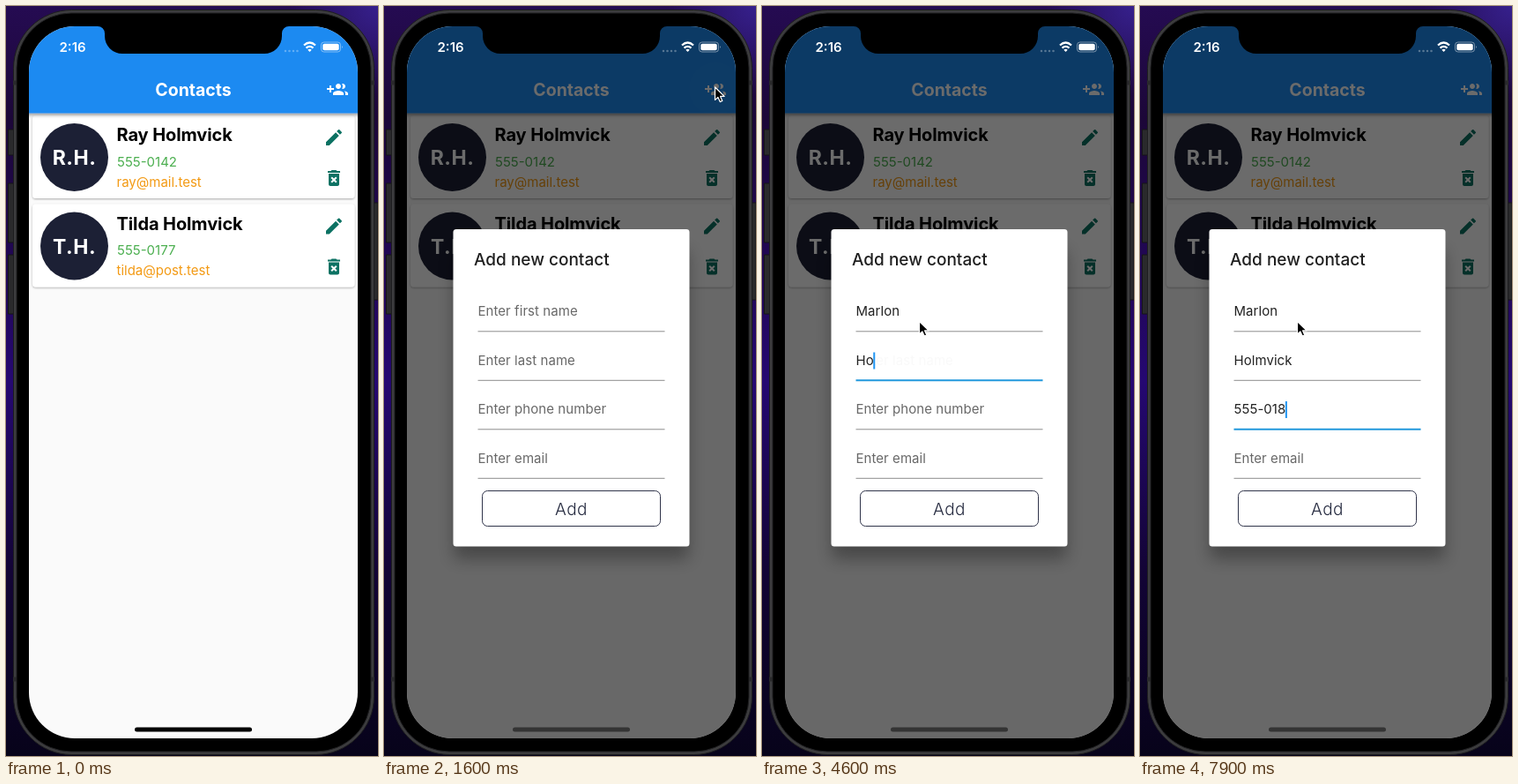
These frames come from a looping animation (422 by 850 pixels, 8000 ms). An HTML page:

```html
<!DOCTYPE html>
<html lang="en">
<head>
<meta charset="utf-8">
<title>Contacts</title>
<style>
html, body { margin: 0; width: 100%; height: 100%; overflow: hidden; background: #120833; }
svg { display: block; width: 422px; height: 850px; font: 15px Inter, "Open Sans", sans-serif; }
text { white-space: pre; }
.mid { text-anchor: middle; }
.name { font-size: 20px; font-weight: 700; letter-spacing: -.1px; }
.initials { font-size: 23px; font-weight: 700; letter-spacing: .5px; fill: #fff; }
.hint { fill: #686868; letter-spacing: .06px; }
.typed { fill: #222; letter-spacing: .06px; }
</style>
</head>
<body>
<svg viewBox="0 0 422 850">
  <defs>
    <linearGradient id="wall" x2="0" y2="1">
      <stop offset="0" stop-color="#250b52"/>
      <stop offset=".15" stop-color="#1c0738"/>
      <stop offset=".38" stop-color="#22075a"/>
      <stop offset=".5" stop-color="#250872"/>
      <stop offset=".75" stop-color="#130436"/>
      <stop offset="1" stop-color="#07031a"/>
    </linearGradient>
    <radialGradient id="glow" cx="1" cy="0" r="1">
      <stop offset="0" stop-color="#36208c"/>
      <stop offset="1" stop-color="#36208c" stop-opacity="0"/>
    </radialGradient>
    <filter id="cardShadow" x="-5%" y="-10%" width="110%" height="125%">
      <feDropShadow dx="0" dy="1" stdDeviation="1" flood-opacity=".32"/>
    </filter>
    <filter id="barShadow" x="-5%" y="-5%" width="110%" height="120%">
      <feDropShadow dx="0" dy="2" stdDeviation="2" flood-opacity=".4"/>
    </filter>
    <filter id="soft" x="-30%" y="-30%" width="160%" height="160%"><feGaussianBlur stdDeviation="9"/></filter>
    <clipPath id="screen"><rect x="26" y="23" width="373" height="807" rx="52"/></clipPath>
    <path id="edit" d="M3 17.25V21h3.75L17.81 9.94l-3.75-3.75L3 17.25zM20.71 7.04a1 1 0 0 0 0-1.41l-2.34-2.34a1 1 0 0 0-1.41 0l-1.83 1.83 3.75 3.75 1.83-1.83z"/>
    <path id="bin" d="M6 19c0 1.1.9 2 2 2h8c1.1 0 2-.9 2-2V7H6v12zm2.46-7.12l1.41-1.41L12 12.59l2.12-2.12 1.41 1.41L13.41 14l2.12 2.12-1.41 1.41L12 15.41l-2.12 2.12-1.41-1.41L10.59 14l-2.13-2.12zM15.5 4l-1-1h-5l-1 1H5v2h14V4z"/>
  </defs>

  <rect width="422" height="850" fill="url(#wall)"/>
  <rect x="322" width="100" height="100" fill="url(#glow)"/>

  <!-- phone body -->
  <path fill="#2a2a2c" stroke="#151517" d="M2.500 140h6v29h-6zM2.500 201h6v67h-6zM2.500 282h6v67h-6zM417 223h5v110h-5z"/>
  <rect x="8.500" y="4.500" width="409" height="844" rx="66" fill="#3c3c3e" stroke="#1c1c1e"/>
  <path d="M8 87h6M8 763h6M412 87h6M412 763h6" stroke="#2a2a2c" stroke-width="5"/>
  <rect x="12" y="8" width="402" height="837" rx="62" fill="#000" stroke="#222224"/>

  <g clip-path="url(#screen)">
    <rect x="26" y="23" width="373" height="807" fill="#fafafa"/>
    <g id="cards"></g>
    <rect x="20" y="10" width="385" height="111.500" fill="#1e8af1" filter="url(#barShadow)"/>
    <text class="mid" x="212.500" y="101.500" fill="#fff" font-size="19.500" font-weight="700">Contacts</text>
    <circle id="ripple" cx="376" cy="94" fill="#fff" r="30"/>
    <path transform="translate(364 83)" fill="#fff" d="M8 10H5V7H3v3H0v2h3v3h2v-3h3v-2zm10 1c1.660 0 2.990-1.340 2.990-3S19.660 5 18 5c-.32 0-.63.05-.91.14.57.81.9 1.790.9 2.860s-.34 2.040-.9 2.860c.28.09.59.14.91.14zm-5 0c1.660 0 2.990-1.340 2.990-3S14.660 5 13 5c-1.660 0-3 1.340-3 3s1.340 3 3 3zm6.620 2.160c.83.73 1.380 1.660 1.380 2.840v2h3v-2c0-1.540-2.370-2.490-4.380-2.840zM13 13c-2 0-6 1-6 3v2h12v-2c0-2-4-3-6-3z"/>
    <rect id="shade" x="26" y="23" width="373" height="807"/>
    <g id="dialog">
      <rect x="79" y="277" width="267" height="350" rx="6" opacity=".3" filter="url(#soft)"/>
      <rect x="78.500" y="253" width="268" height="359.500" rx="3.500" fill="#fff"/>
      <text x="102" y="294" font-size="19" font-weight="500" fill="#1f1f1f">Add new contact</text>
      <g id="fields"></g>
      <rect id="caret" width="2" height="19" fill="#2196f3"/>
      <rect x="111.500" y="549.500" width="202" height="40" rx="6" fill="none" stroke="#30344a"/>
      <text class="mid" x="212.500" y="576.500" font-size="19" font-weight="300" letter-spacing=".4" fill="#262b40">Add</text>
    </g>
    <rect id="home" x="146" y="817.500" width="133" height="5" rx="2.500"/>
  </g>

  <!-- notch and status bar -->
  <path d="M104 22v1a8 8 0 0 1 8 8v3a20 20 0 0 0 20 20h161a20 20 0 0 0 20-20v-3a8 8 0 0 1 8-8v-1z"/>
  <g fill="#fff">
    <text x="60.500" y="52" font-weight="600">2:16</text>
    <path d="M317 51h16" stroke="#fff" stroke-width="2.600" stroke-linecap="round" stroke-dasharray="0 4.500" opacity=".3"/>
    <g fill="none" stroke="#fff" stroke-width="2.300">
      <path d="M338 44.500q6.500-6 13 0M340.500 47.700q4-3.600 8 0"/>
    </g>
    <path d="M342.300 49.700q2.200-1.800 4.400 0l-2.200 2.300z"/>
    <rect x="357.500" y="41" width="22" height="11" rx="3.200" fill="none" stroke="#fff" opacity=".45"/>
    <rect x="359.300" y="42.800" width="18.400" height="7.400" rx="1.800"/>
    <path d="M381 45q1.600 1.500 0 3z" opacity=".6"/>
  </g>

  <path id="cursor" d="M0 0V14.500L3.400 11.400L5.700 16.600L8.300 15.500L6.100 10.400H10.600Z" stroke="#fff" stroke-width="1.200" stroke-linejoin="round"/>
</svg>

<script>
const LOOP = 8000;
const $ = id => document.getElementById(id);
const clamp = v => Math.max(0, Math.min(1, v));
const ramp = (t, from, to) => clamp((t - from) / (to - from));
const ease = p => p * p * (3 - 2 * p);
const mix = (a, b, p) => a + (b - a) * p;

const contacts = [
  ["Ray Holmvick", "R.H.", "555-0142", "ray@mail.test"],
  ["Tilda Holmvick", "T.H.", "555-0177", "tilda@post.test"]
];
$("cards").innerHTML = contacts.map(([name, initials, phone, email], i) => `
  <g transform="translate(0 ${i * 100.5})">
    <rect x="30" y="124" width="365.500" height="94" rx="4" fill="#fff" filter="url(#cardShadow)"/>
    <circle cx="77.500" cy="171.500" r="38.500" fill="#1c2035"/>
    <text class="initials mid" x="77.500" y="180">${initials}</text>
    <text class="name" x="125.500" y="153">${name}</text>
    <text x="126" y="181.500" fill="#4caf50">${phone}</text>
    <text x="125.500" y="204.500" fill="#f39a14">${email}</text>
    <g fill="#0c7263"><use href="#edit" x="360" y="137"/><use href="#bin" x="360" y="183"/></g>
  </g>`).join("");

// focus: field gets the caret; start and step: typing rhythm
const fields = [
  { hint: "Enter first name", text: "Marlon", focus: 2800, start: 3150, step: 150 },
  { hint: "Enter last name", text: "Holmvick", focus: 4150, start: 4350, step: 150 },
  { hint: "Enter phone number", text: "555-018", focus: 5750, start: 6600, step: 200 },
  { hint: "Enter email", text: "", focus: Infinity, start: Infinity, step: 1 }
];
$("fields").innerHTML = fields.map((f, i) => `
  <g transform="translate(0 ${i * 55.5})">
    <text class="hint" x="106.500" y="351">${f.hint}</text>
    <text class="typed" x="106.500" y="351"></text>
    <path class="line" d="M106.500 368.800H318.500"/>
  </g>`).join("");
fields.forEach((f, i) => {
  const row = $("fields").children[i];
  [f.hintEl, f.typedEl, f.lineEl] = row.children;
});

function drawFields(t) {
  const active = fields.filter(f => t >= f.focus).length - 1;
  fields.forEach((f, i) => {
    const count = t < f.start ? 0 : Math.min(f.text.length, Math.floor((t - f.start) / f.step) + 1);
    f.typedEl.textContent = f.text.slice(0, count);
    f.hintEl.setAttribute("opacity", count ? 1 - ramp(t, f.start, f.start + 260) : 1);
    f.lineEl.setAttribute("stroke", i === active ? "#2298dc" : "#8c8c8c");
    f.lineEl.setAttribute("stroke-width", i === active ? 2 : 1);
    if (i !== active) return;
    const lastInput = count ? f.start + (count - 1) * f.step : f.focus;
    const x = 106 + (count ? f.typedEl.getComputedTextLength() : 0);
    $("caret").setAttribute("transform", `translate(${x} ${337 + i * 55.5})`);
    $("caret").setAttribute("opacity", (t - lastInput) % 1000 < 500 ? 1 : 0);
  });
  if (active < 0) $("caret").setAttribute("opacity", 0);
}

function drawCursor(t) {
  const enter = ease(ramp(t, 600, 1150));
  const down = ease(ramp(t, 1850, 2550));
  const x = mix(mix(426, 375.5, enter), 178.5, down);
  const y = mix(mix(250, 92, enter), 357.5, down);
  $("cursor").setAttribute("transform", `translate(${x} ${y})`);
}

function draw(now) {
  const t = now % LOOP;
  const open = ramp(t, 1440, 1590);
  $("shade").setAttribute("opacity", .58 * open);
  $("dialog").setAttribute("opacity", open);
  $("home").setAttribute("opacity", 1 - .5 * open);
  $("ripple").setAttribute("opacity", .02 * ramp(t, 1150, 1300) * (1 - ramp(t, 1850, 2000)));
  drawFields(t);
  drawCursor(t);
}

const begin = performance.now();
function tick() {
  draw(performance.now() - begin);
  requestAnimationFrame(tick);
}
tick();
</script>
</body>
</html>
```
